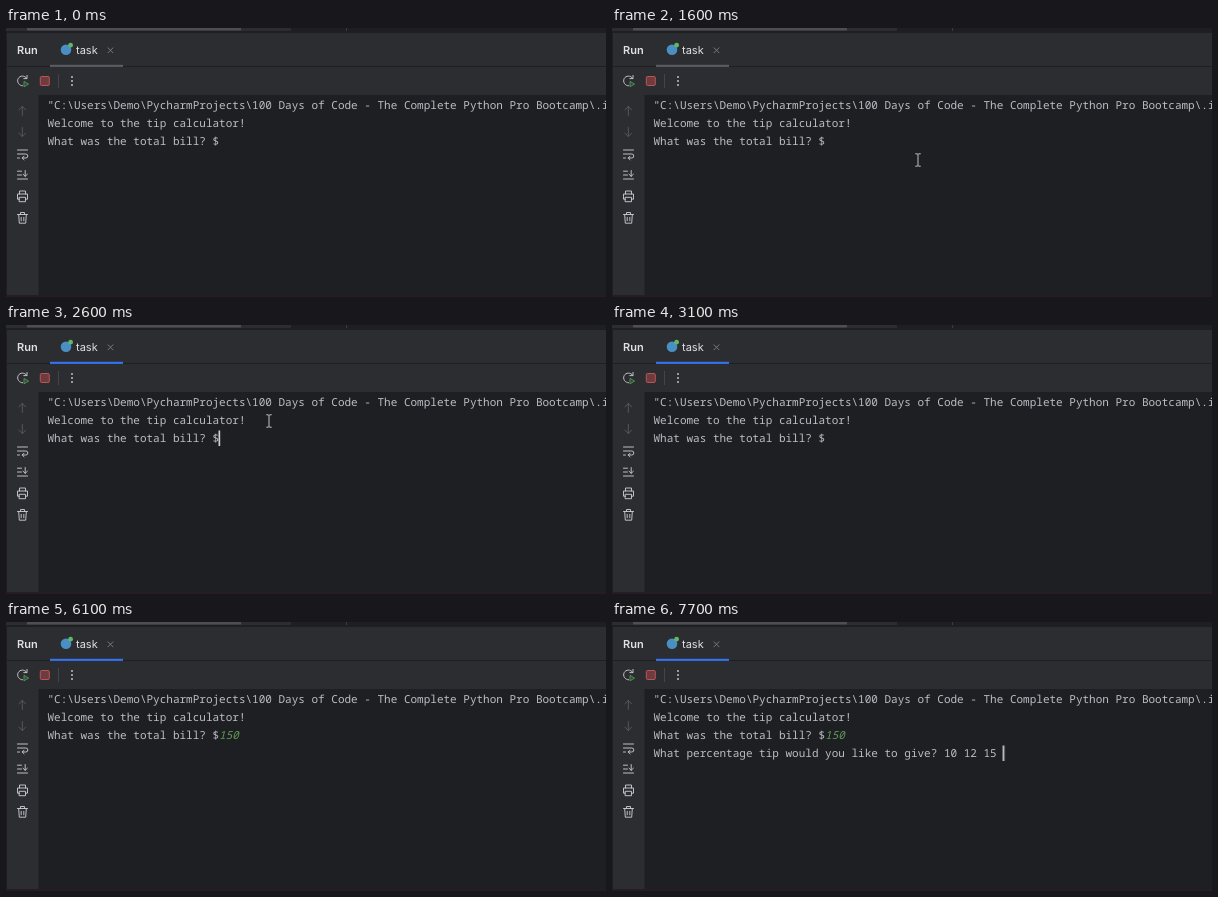
An HTML page for the animation above (8000 ms loop, 600 by 269 pixels).

```html
<!DOCTYPE html>
<html lang="en">
<head>
<meta charset="utf-8">
<title>Tip calculator run</title>
<style>
  html, body { margin: 0; width: 100%; height: 100%; overflow: hidden; background: #1e1f22; }
  svg { display: block; width: 600px; height: 269px; }
  text { white-space: pre; text-rendering: geometricPrecision; }
  .ui { font: 11px Inter, sans-serif; fill: #dfe1e5; }
  .bold { font-weight: 600; }
  .console { font: 11px "Noto Sans Mono", monospace; fill: #bcbec4; }
  .input { font-style: italic; fill: #5f9a58; }
  .icon { fill: none; stroke: #ced0d6; stroke-width: .9; stroke-linecap: round; stroke-linejoin: round; }
  .dim { stroke: #5a5d63; }

  .tab, .caret, .mouse, .one, .rest, .ask { animation: 8s step-end infinite; }
  .tab { animation-name: focus; }
  .caret { animation-name: caret; }
  .mouse { animation-name: mouse; }
  .one { animation-name: one; }
  .rest { animation-name: rest; }
  .ask { animation-name: ask; }

  @keyframes focus { 0% { fill: #5a5d63 } 27.5%, 100% { fill: #3574f0 } }
  @keyframes one { 0% { opacity: 0 } 61.25%, 100% { opacity: 1 } }
  @keyframes rest { 0% { opacity: 0 } 67.5%, 100% { opacity: 1 } }
  @keyframes ask { 0% { opacity: 0 } 83.75%, 100% { opacity: 1 } }

  /* Blinks while idle, then follows the typing */
  @keyframes caret {
    0%, 38.75%, 53.75% { opacity: 0; transform: none }
    25%, 46.25%, 58.75% { opacity: 1; transform: none }
    61.25% { opacity: 1; transform: translate(6.6px, 0) }
    67.5% { opacity: 1; transform: translate(19.8px, 0) }
    75% { opacity: 0; transform: translate(19.8px, 0) }
    83.75%, 96.25%, 100% { opacity: 1; transform: translate(178.2px, 18px) }
    92.5% { opacity: 0; transform: translate(178.2px, 18px) }
  }

  /* Enters from the right, clicks the console, leaves upwards */
  @keyframes mouse {
    0% { opacity: 0; transform: translate(596px, 134.5px) }
    12.5% { opacity: 1; transform: translate(596px, 134.5px) }
    13.75% { opacity: 1; transform: translate(562px, 146px) }
    15% { opacity: 1; transform: translate(510px, 153px) }
    16.25% { opacity: 1; transform: translate(452px, 153px) }
    17.5% { opacity: 1; transform: translate(396px, 148px) }
    18.75% { opacity: 1; transform: translate(346px, 140px) }
    20% { opacity: 1; transform: translate(306px, 132px) }
    21.25% { opacity: 1; transform: translate(278px, 126px) }
    22.5% { opacity: 1; transform: translate(263px, 121px) }
    23.75% { opacity: 1; transform: translate(256px, 117px) }
    25% { opacity: 1; transform: translate(253px, 115.5px) }
    31.25% { opacity: 1; transform: translate(255px, 111px) }
    32.5% { opacity: 1; transform: translate(263px, 96px) }
    33.75% { opacity: 1; transform: translate(278px, 67px) }
    35% { opacity: 1; transform: translate(297px, 32px) }
    36.25%, 100% { opacity: 0; transform: translate(297px, 32px) }
  }
</style>
</head>
<body>
<svg viewBox="0 0 600 269" xmlns="http://www.w3.org/2000/svg">
  <!-- panels -->
  <rect width="600" height="269" fill="#1e1f22"/>
  <rect width="285" height="3" fill="#2b2d30"/>
  <rect x="21" width="214" height="2.5" fill="#4d4f53"/>
  <rect x="340" width="1" height="3" fill="#393b40"/>
  <rect x="1" y="5" width="599" height="62" fill="#2b2d30"/>
  <rect x="1" y="67" width="31.5" height="200" fill="#2b2d30"/>
  <rect x="1" y="38" width="599" height="1" fill="#1e1f22"/>
  <rect y="267" width="600" height="2" fill="#271c25"/>

  <!-- header -->
  <text class="ui bold" x="11" y="25.5">Run</text>
  <circle cx="60" cy="21.8" r="5.3" fill="#4a8fc4"/>
  <circle cx="64.6" cy="17.2" r="2.4" fill="#5fb865"/>
  <text class="ui" x="70" y="25.5">task</text>
  <path class="icon" style="stroke:#7d8087" d="M102 19.8l5 5m0-5l-5 5"/>
  <rect class="tab" x="44" y="36.8" width="73" height="2.1"/>

  <!-- toolbar -->
  <path class="icon" d="M20.6 50.2A4.9 4.9 0 1 0 16.6 57.8M21 47.4v3.2h-3.2"/>
  <path d="M18 53.4l4.6 2.7-4.6 2.7z" fill="#2f4a35" stroke="#57965c" stroke-width=".9" stroke-linejoin="round"/>
  <rect x="34.3" y="48.5" width="9" height="9" rx="1.2" fill="#6e3c3e" stroke="#c75a5b" stroke-width=".9"/>
  <rect x="52" y="46" width="1" height="14" fill="#43454a"/>
  <g fill="#ced0d6">
    <circle cx="66" cy="49" r=".9"/>
    <circle cx="66" cy="53" r=".9"/>
    <circle cx="66" cy="57" r=".9"/>
  </g>

  <!-- side icons -->
  <g class="icon">
    <path class="dim" d="M16.3 87.5v-9m-3.4 3.4l3.4-3.4 3.4 3.4"/>
    <path class="dim" d="M16.3 99.5v9m-3.4-3.4l3.4 3.4 3.4-3.4"/>
    <path d="M11.5 122h10M11.5 126h8.3a2 2 0 0 1 0 4h-3.6m1.8-1.8l-1.8 1.8 1.8 1.8M11.5 130h2"/>
    <path d="M11.5 143.2h4M11.5 147h4M11.5 151h10M19.2 142.5v5.8m-2.2-2.1l2.2 2.1 2.2-2.1"/>
    <path d="M13.5 166v-3h6v3M13.5 171.2h-2v-5.2h10v5.2h-2M13.5 169.3h6v4.4h-6z"/>
    <path d="M11.5 186.5h10M14.5 186.3v-1.8h4v1.8M12.7 186.8l.6 8.4h6.4l.6-8.4M15.2 189.3v3.5M17.8 189.3v3.5"/>
  </g>

  <!-- console -->
  <g class="console">
    <text x="41.5" y="81">"C:\Users\Demo\PycharmProjects\100 Days of Code - The Complete Python Pro Bootcamp\.idea</text>
    <text x="41.5" y="99">Welcome to the tip calculator!</text>
    <text x="41.5" y="117">What was the total bill? $</text>
    <text class="input one" x="213.1" y="117">1</text>
    <text class="input rest" x="219.7" y="117">50</text>
    <text class="ask" x="41.5" y="135">What percentage tip would you like to give? 10 12 15 </text>
  </g>
  <rect class="caret" x="212.5" y="105.5" width="1.7" height="15.5" fill="#ced0d6"/>

  <path class="mouse" d="M-2.7 -6.2h1.8l.9.7.9-.7h1.8M0 -5.5v11M-2.7 6.2h1.8l.9-.7.9.7h1.8" fill="none" stroke="#d5d6d9" stroke-width=".9"/>
</svg>
</body>
</html>
```
